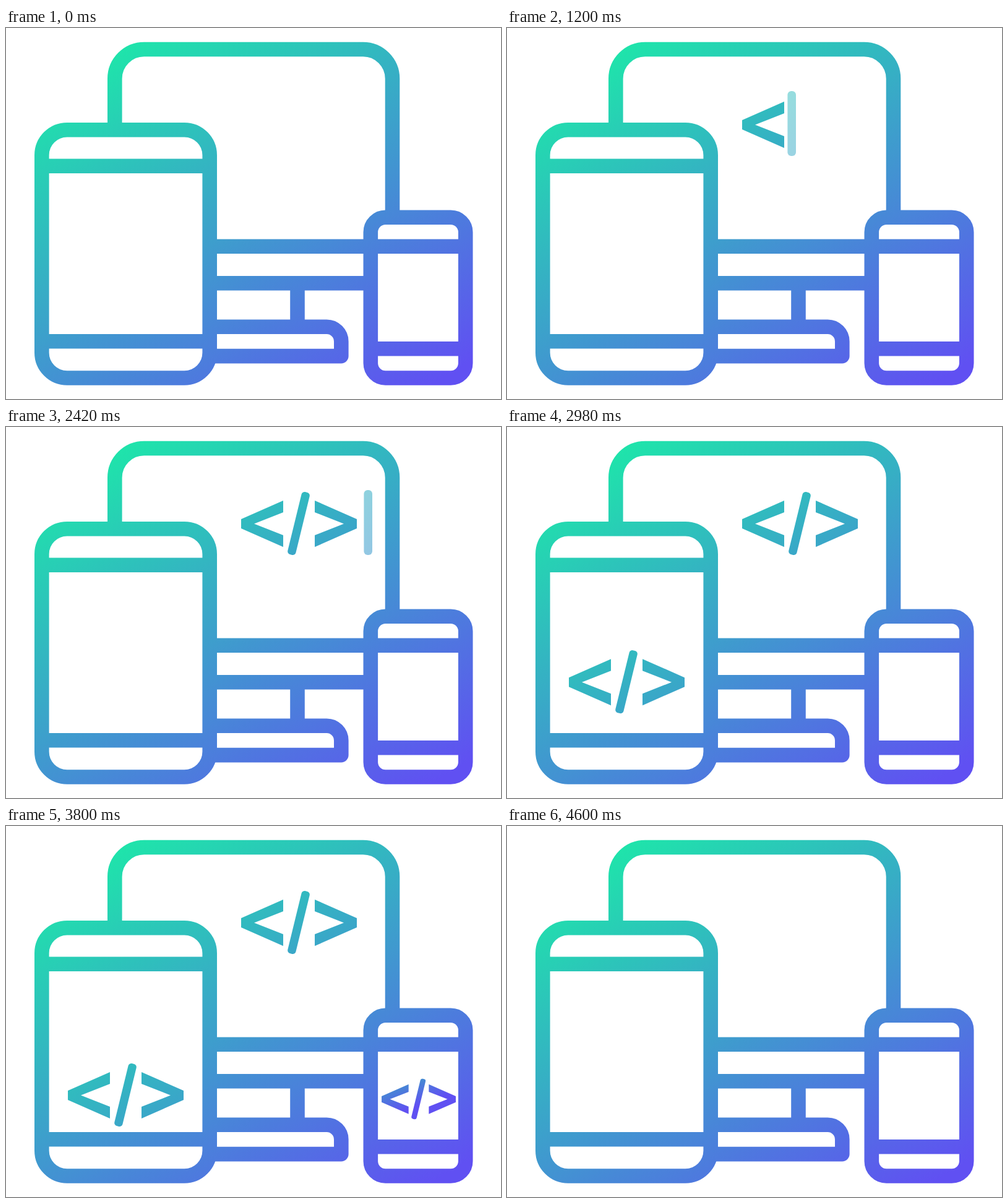
Write an HTML page that moves like this. It is 800x600 px and loops after 4.8 s.

```html
<!DOCTYPE html>
<html lang="en">
<head>
<meta charset="utf-8">
<title>Code on every screen</title>
<style>
  html, body { margin: 0; width: 100%; height: 100%; overflow: hidden; background: #fff; }
  svg { display: block; width: 100%; height: 100%; }
</style>
</head>
<body>
<svg viewBox="0 0 800 600">
  <defs>
    <linearGradient id="main" gradientUnits="userSpaceOnUse" x1="67" y1="111" x2="438" y2="728">
      <stop stop-color="#1fe3ab"/>
      <stop offset="1" stop-color="#6050f2"/>
    </linearGradient>
    <linearGradient id="small" gradientUnits="userSpaceOnUse" x1="447" y1="99" x2="475" y2="172">
      <stop stop-color="#3f97cc"/>
      <stop offset="1" stop-color="#6050f2"/>
    </linearGradient>
    <path id="lt" d="M448 119L380 149V164L448 194V175L401 156.5L448 138Z"/>
    <rect id="slash" x="466.25" y="104" width="13.5" height="104" rx="5" transform="rotate(13.7 473 156)"/>
    <path id="gt" d="M499 119L567 149V164L499 194V175L546 156.5L499 138Z"/>
    <g id="code"><use href="#lt"/><use href="#slash"/><use href="#gt"/></g>
  </defs>

  <g fill="none" stroke="url(#main)" stroke-width="23.6" stroke-linejoin="round">
    <!-- monitor and stand -->
    <path d="M175.8 160V82A47.5 47.5 0 0 1 223.3 34.5H577A47.5 47.5 0 0 1 624.5 82V300"/>
    <path d="M335 353.2H585M335 412.7H585M471 415V480"/>
    <path d="M330 483.3H518.2A23.6 23.6 0 0 1 541.8 506.9V530.6H330"/>
    <!-- tablet -->
    <rect x="57.8" y="164.7" width="271.4" height="401.3" rx="41"/>
    <path d="M60 223.2H327M60 506.8H327"/>
    <!-- phone -->
    <rect x="589.3" y="306.2" width="153.4" height="259.8" rx="24"/>
    <path d="M592 353.2H740M592 518.7H740"/>
  </g>

  <g fill="url(#main)">
    <rect id="cursor" y="102" width="13.6" height="105" rx="6"/>
    <g id="monitor">
      <use id="open" href="#lt"/><use id="mid" href="#slash"/><use id="close" href="#gt"/>
    </g>
    <use id="tablet" href="#code"/>
    <use id="phone" href="#code" fill="url(#small)"/>
  </g>
</svg>
<script>
  const LOOP = 4800;
  const el = id => document.getElementById(id);
  const clamp = v => Math.max(0, Math.min(1, v));
  const ramp = (t, from, to) => clamp((t - from) / (to - from));
  const smooth = p => p * p * (3 - 2 * p);
  const fade = (id, value) => el(id).setAttribute('opacity', value);
  const place = (id, transform) => el(id).setAttribute('transform', transform);

  // start time and x of each cursor blink
  const blinks = [[120, 360.4], [760, 360.4], [1140, 453.4], [1660, 578.4], [2240, 578.4]];

  function draw(t) {
    const [start, x] = blinks.findLast(([begin]) => t >= begin) || blinks[0];
    el('cursor').setAttribute('x', x);
    fade('cursor', Math.min(ramp(t, start, start + 120), 1 - ramp(t, start + 120, start + 260)));

    fade('open', ramp(t, 1020, 1150));
    fade('mid', ramp(t, 1400, 1580));
    fade('close', ramp(t, 1580, 1700));
    fade('monitor', 1 - ramp(t, 3860, 4110));

    const hop = 37 * (smooth(ramp(t, 2790, 3120)) - smooth(ramp(t, 3120, 3430)));
    place('tablet', `translate(-280 ${279 - hop})`);
    fade('tablet', ramp(t, 2500, 2780) * (1 - ramp(t, 4110, 4360)));

    const scale = 0.64 * (1 + 0.32 * (1 - ramp(t, 3080, 3860)) ** 2);
    place('phone', `translate(667 441.5) scale(${scale}) translate(-473.5 -156)`);
    fade('phone', ramp(t, 3080, 3260) * (1 - ramp(t, 4360, 4600)));
  }

  const begin = performance.now();
  function tick() {
    draw((performance.now() - begin) % LOOP);
    requestAnimationFrame(tick);
  }
  tick();
</script>
</body>
</html>
```
